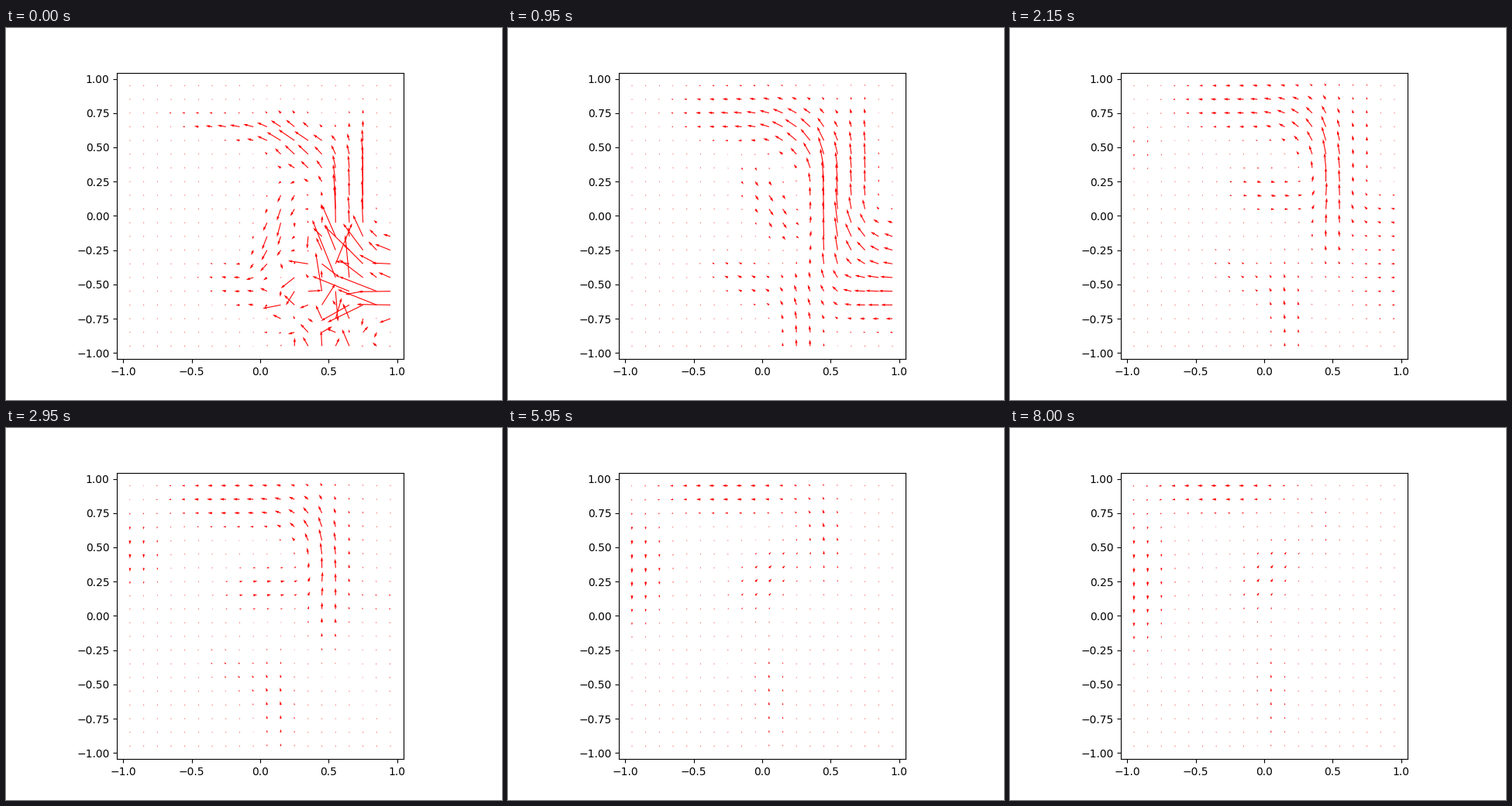
Write a matplotlib script that moves like this. It is 640 px wide and 480 px high and loops after 8.05 s.

```python
import numpy as np
import matplotlib.pyplot as plt
from matplotlib.animation import FuncAnimation

FRAMES, STEP = 161, 50
AXIS = np.linspace(-0.95, 0.95, 20)
X, Y = np.meshgrid(AXIS, AXIS)

# Random kicks in the lower right that die out quickly
rng = np.random.default_rng(7)
RADIUS2 = ((X - 0.5) / 0.24) ** 2 + ((Y + 0.55) / 0.26) ** 2
KICKS = 27 * np.exp(-RADIUS2 / 2) * rng.normal(size=(2, *X.shape))


def jet(x, y, angle, speed, length, width):
    """Gaussian stream, stretched along its own direction."""
    c, s = np.cos(np.radians(angle)), np.sin(np.radians(angle))
    along = ((X - x) * c + (Y - y) * s) / length
    across = ((Y - y) * c - (X - x) * s) / width
    power = speed * np.exp(-(along ** 2 + across ** 2) / 2)
    return np.array([power * c, power * s])


def flow(n):
    def fade(rate):
        return np.exp(-n / rate)

    main = jet(0.48 + 0.06 * fade(10), 0.65 - 0.85 * fade(55), 91,
               45 * fade(48), 0.36, 0.1 - 0.06 * fade(6))
    side = jet(0.72, 0.15 + 0.01 * n, 91,
               45 * fade(20), 0.3, 0.07 - 0.02 * fade(5))
    corner = jet(0.3 + 0.0005 * n, 0.72 - 0.25 * fade(50), 128,
                 18 * fade(60), 0.2, 0.13)
    top = jet(-0.002 * n, 0.97 - 0.36 * fade(55), 180 - 10 * fade(40),
              7 + 7 * fade(40), 0.38, 0.16 - 0.1 * fade(10))
    left = jet(-0.95, 0.6 - 0.0022 * n, 268,
               7 * (1 - np.exp(-(n / 50) ** 3)), 0.12 + 0.0016 * n, 0.2)
    # The inner return flow turns from down to up-right
    inner = jet(0.02 + 0.1 * fade(40), 0.32 - 0.4 * fade(45),
                60 - 170 * fade(50), 5 + 14 * fade(22),
                0.26, 0.16 - 0.08 * fade(40))
    inlet = jet(0.95, -0.63 + 0.004 * n, 180,
                50 * fade(18), 0.3, 0.07 + 0.005 * n)
    upper_inlet = jet(0.95, -0.32 + 0.008 * n, 160, 22 * fade(25), 0.2, 0.13)
    bend = jet(0.7, -0.35 + 0.008 * n, 122, 25 * fade(18), 0.18, 0.09)
    floor = jet(0.05 + 0.4 * fade(35), -0.55 - 0.4 * fade(50), 92,
                4 + 18 * fade(18), 0.35, 0.11)
    drift = jet(-0.05 - 0.0025 * n, -0.52 + 0.002 * n, 140 + 25 * fade(30),
                9 * fade(60), 0.25, 0.12)
    return (main + side + corner + top + left + inner + inlet
            + upper_inlet + bend + floor + drift + KICKS * fade(3))


fig, ax = plt.subplots(figsize=(6.4, 4.8), dpi=100)
ax.set_aspect("equal")
ax.set(xlim=(-1.045, 1.045), ylim=(-1.045, 1.045),
       xticks=np.linspace(-1, 1, 5), yticks=np.linspace(-1, 1, 9))
arrows = ax.quiver(X, Y, *flow(0), color="red",
                   scale=1, scale_units="dots", width=0.003)


def update(n):
    arrows.set_UVC(*flow(n))
    return (arrows,)


anim = FuncAnimation(fig, update, frames=FRAMES, interval=STEP,
                     repeat=True, repeat_delay=0)
plt.show()
```
